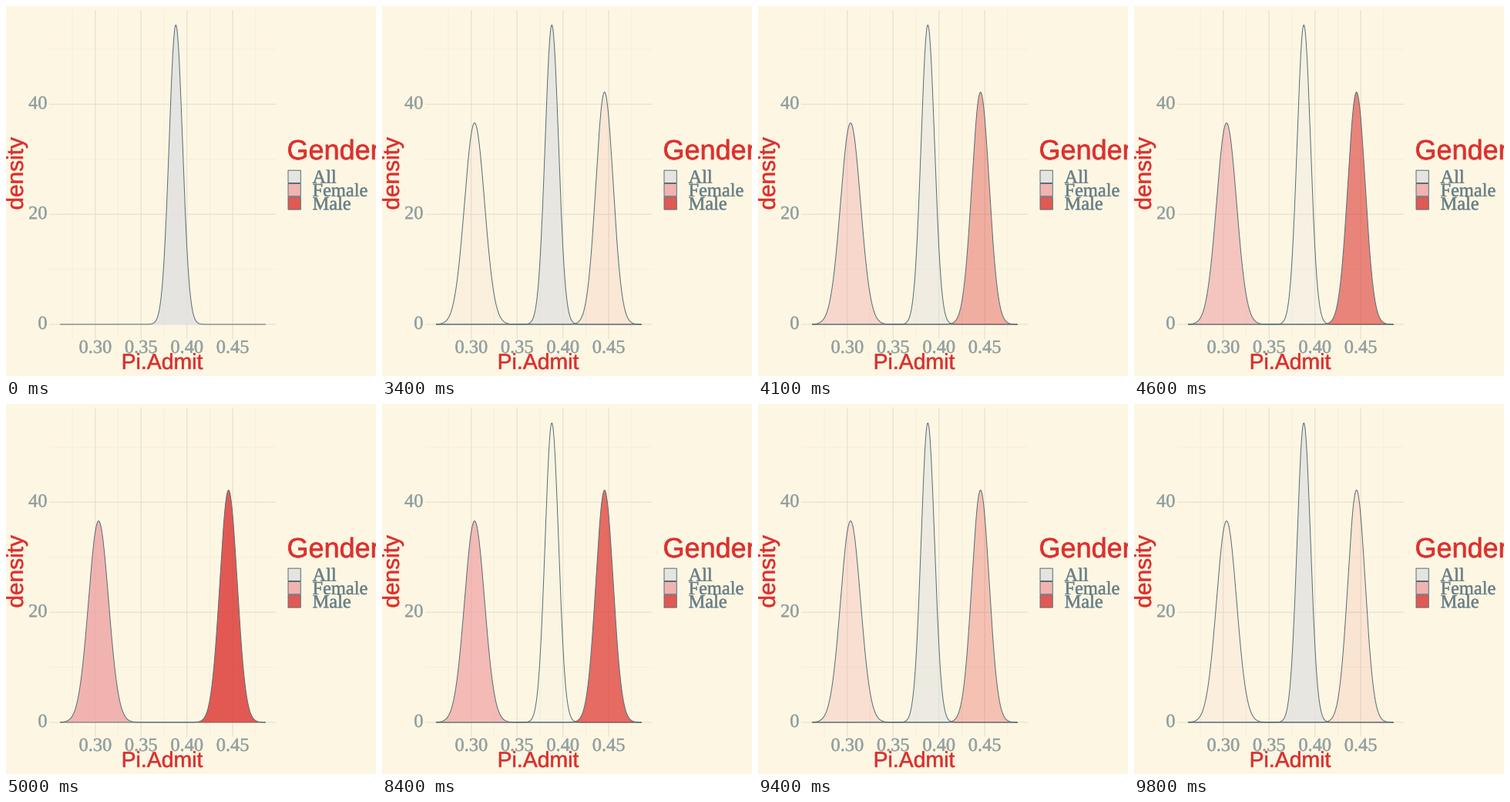
Recreate the animation shown at these times as a matplotlib script. Size 480 px wide and 480 px high, loop 10 s.

```python
import numpy as np
import matplotlib.pyplot as plt
from matplotlib.animation import FuncAnimation
from matplotlib.patches import Rectangle
from matplotlib.patheffects import withStroke

SIZE, DPI, STEP_MS, LOOP_MS = 480, 100, 100, 10000
PT = 72 / DPI  # points per pixel
BG, RED, SLATE, GREY = "#fdf6e3", "#dc322f", "#586e75", "#93a1a1"
SERIF, SANS = "Liberation Serif", "Liberation Sans"
ALPHA = 0.8
FADE_IN = [3400, 3600, 3700, 3900, 4100, 4300, 4400, 4600, 4800, 4900, 5000]
FADE_OUT = range(8400, LOOP_MS + 1, 200)

# Each group: fill colour, mean admission rate, peak density.
GROUPS = {
    "All": ("#e0e0e0", 0.3879, 54.4),
    "Female": ("#efa2a4", 0.3036, 36.6),
    "Male": (RED, 0.4454, 42.2),
}


def px(rate):
    return 115.8 + 1189 * (rate - 0.30)


def py(density):
    return 413 - 7.14 * density


def normal(rate, mean, peak):
    """Normal density whose spread follows from its peak height."""
    sd = 1 / (peak * np.sqrt(2 * np.pi))
    return peak * np.exp(-((rate - mean) / sd) ** 2 / 2)


def text(x, y, label, size, color, font, weight=0.4, **kw):
    stroke = [withStroke(linewidth=weight * PT, foreground=color)]
    return ax.text(x, y, label, fontsize=size * PT, color=color, family=font,
                   path_effects=stroke, **{"va": "baseline", **kw})


def grid(rates, densities, color, width):
    style = dict(color=color, lw=width * PT, zorder=1, snap=False)
    ax.vlines([px(r) for r in rates], 5.5, 432, **style)
    ax.hlines([py(d) for d in densities], 56, 350, **style)


fig = plt.figure(figsize=(SIZE / DPI, SIZE / DPI), dpi=DPI, facecolor=BG)
ax = fig.add_axes([0, 0, 1, 1])
ax.set(xlim=(0, SIZE), ylim=(SIZE, 0))
ax.axis("off")

rate_ticks = 0.30 + 0.05 * np.arange(4)
density_ticks = [0, 20, 40]
grid(0.275 + 0.05 * np.arange(5), [10, 30, 50], "#f4eedb", 0.9)
grid(rate_ticks, density_ticks, "#e4dfcd", 1.1)

for rate in rate_ticks:
    text(px(rate), 450, f"{rate:.2f}", 24.4, GREY, SERIF, ha="center")
for density in density_ticks:
    text(53.5, py(density) + 6, str(density), 24.4, GREY, SERIF, ha="right")
text(202.5, 471, "Pi.Admit", 28.4, RED, SANS, ha="center")
text(14, 217.5, "density", 29.8, RED, SANS, ha="center", va="center", rotation=90)
text(364.5, 199, "Gender", 36, RED, SANS, weight=0.6)

fills, outlines = {}, {}
rates = np.linspace(0.262, 0.4855, 512)
for k, (name, (color, mean, peak)) in enumerate(GROUPS.items()):
    top = 213.2 + 17.3 * k
    ax.add_patch(Rectangle((366, top), 16.3, 16.3, fc=color, ec="none", alpha=ALPHA))
    ax.add_patch(Rectangle((366, top), 16.3, 16.3, fc="none", ec=SLATE, lw=PT,
                           snap=False))
    text(397.5, top + 16.4, name, 24.4, "#6b8087", SERIF)

    xs, ys = px(rates), py(normal(rates, mean, peak))
    fills[name] = ax.fill_between(xs, ys, py(0), fc=color, ec="none", zorder=3 + k)
    outlines[name], = ax.plot(xs, ys, color=SLATE, lw=PT, zorder=3.5 + k, snap=False)


def split_share(ms):
    """How far the chart has moved from the pooled curve to the two groups."""
    if ms >= FADE_OUT[0]:
        return 1 - np.searchsorted(FADE_OUT, ms, side="right") / len(FADE_OUT)
    return np.searchsorted(FADE_IN, ms, side="right") / len(FADE_IN)


def draw(i):
    share = split_share(i * STEP_MS)
    for name in GROUPS:
        level = 1 - share if name == "All" else share
        fills[name].set_alpha(ALPHA * level)
        outlines[name].set_visible(bool(level > 0))
    return [*fills.values(), *outlines.values()]


anim = FuncAnimation(fig, draw, frames=LOOP_MS // STEP_MS, interval=STEP_MS,
                     repeat=True, repeat_delay=0)
plt.show()
```
